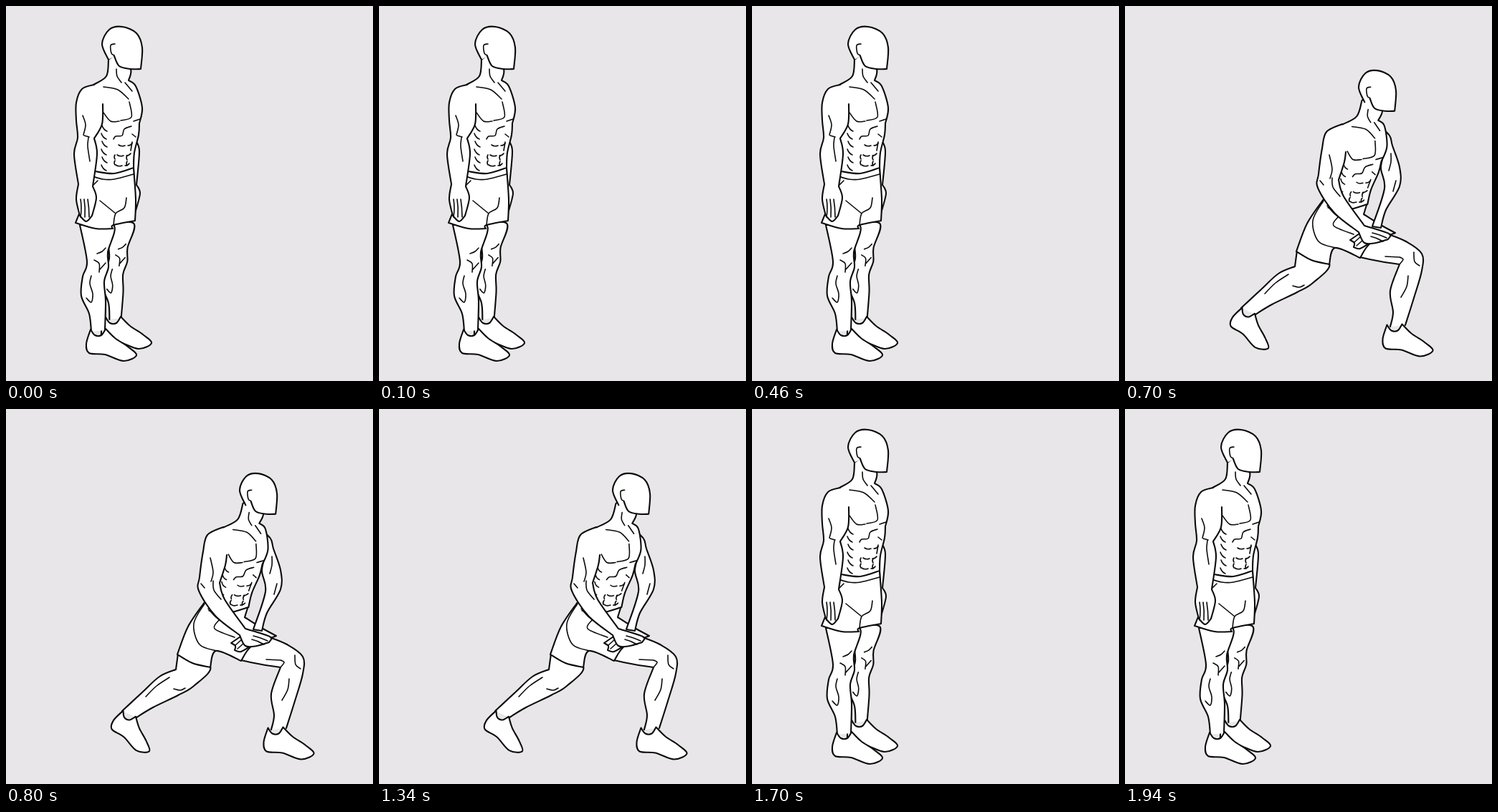
An HTML page that plays this animation: 512x524 px, repeating every 2100 ms.

```html
<!DOCTYPE html>
<html lang="en">
<head>
<meta charset="utf-8">
<title>Lunge exercise</title>
<style>
  html, body { margin: 0; width: 100%; height: 100%; overflow: hidden; background: #e8e6e9; }
  svg { display: block; width: 100%; height: 100%; }
  path { stroke: #0b0b0b; stroke-linecap: round; stroke-linejoin: round; vector-effect: non-scaling-stroke; }
  .shape { fill: #fff; stroke-width: 2.1; }
  .line { fill: none; stroke-width: 1.6; }
</style>
</head>
<body>
<svg viewBox="0 0 512 524">
  <g id="stand"></g>
  <g id="lunge"></g>
</svg>
<script>
// Catmull-Rom curve through the points, as Bezier segments
function smoothRun(points) {
  return points.slice(1).map((b, i) => {
    const a = points[i], before = points[i - 1] || a, after = points[i + 2] || b;
    const c1 = a.map((v, k) => v + (b[k] - before[k]) / 6);
    const c2 = b.map((v, k) => v - (after[k] - a[k]) / 6);
    return `C${c1} ${c2} ${b}`;
  }).join('');
}

// Key points are joined smoothly; "/" makes a corner, ";" lifts the pen.
function curve(text) {
  return text.split(';').map(stroke => {
    const runs = stroke.split('/').map(run =>
      run.trim().split(/\s+/).map(p => p.split(',').map(Number)));
    return 'M' + runs[0][0] + runs.map((run, i) =>
      smoothRun(i ? [runs[i - 1].at(-1), ...run] : run)).join('');
  }).join('');
}

const path = (kind, d) => `<path class="${kind}" d="${d}"/>`;
const shape = points => path('shape', curve(points));
const lines = points => path('line', curve(points));
const repeat = (count, stroke) =>
  path('line', Array.from({ length: count }, (_, i) => stroke(i)).join(''));
const place = (transform, ...parts) => `<g transform="${transform}">${parts.join('')}</g>`;

// Body parts shared by both poses
const head =
  shape('143,75 134,53 144,33 162,29 182,38 190,58 188,88 / 174,88 158,84 151,70') +
  lines('152,53 146,55 147,66 151,69');

const torso =
  shape('122,110 140,98 143,75 / 160,60 / 174,88 171,104 / 181,112 190,142 186,164 / 185,180 179,205 178,226 / 151,234 124,231') +
  lines('154,88 155,98 161,107;166,107 176,119') +
  lines('136,113 156,117 171,130;172,134 175,155 160,160;136,149 146,161 158,161;178,161 187,158') +
  lines('150,186 153,182 162,181 165,172 175,168;176,179 181,183;176,190 174,202') +
  repeat(3, i => `M${157 - 2 * i},${194 + 14 * i}q4 3 9 1m4 0q4 0 6 -3`) +
  repeat(2, i => `M152,${208 + 8 * i}q-2 3 0 6m17 -5q-2 3 0 6`) +
  repeat(6, i => `M${134 - i % 2},${167 + 11 * i}q2 6 7 8`);

const leg =
  shape('119,455 116,430 105,405 107,378 113,357 103,306 / 150,306 142,344 143,365 137,385 139,412 138,453') +
  lines('139,338 134,343 127,346;123,355 130,360 130,372;139,359 131,368') +
  lines('119,377 117,388 121,402 119,414 112,408');

const shoe = shape('118,452 / 112,472 116,485 138,487 164,496 182,488 170,476 152,464 139,451 / 133,460 124,460 118,452');

const standing = [
  shape('181,188 186,203 182,250 / 187,262 180,289 / 178,225'),
  place('matrix(.85 0 -.05 .9 66 28.4)', leg),
  place('translate(21 -17)', shoe),
  leg,
  shoe,
  shape('121,231 / 113,262 97,303 / 125,311 149,311 / 150,306 180,300 / 181,270 178,227'),
  lines('121,238 135,242 151,242 178,235;131,272 153,290;168,268 165,282 153,290 150,306;122,250 128,244'),
  torso,
  shape('123,110 106,116 98,135 98,160 100,184 95,207 101,249 / 98,270 103,293 / 112,301 120,293 / 126,268 121,252 / 127,207 123,185 / 134,165 135,137'),
  lines('107,153 111,166 108,180;115,184 114,196 117,217;109,181 116,183'),
  repeat(3, i => `M${104 + 5 * i},270q2 12 ${i} 25`),
  head
];

const lunging = [
  shape('162,422 190,396 214,374 237,364 / 240,342 / 285,360 262,387 240,400 205,417 182,431'),
  lines('250,390 243,393 234,391;228,375 210,387 195,402'),
  place('translate(172 426) rotate(28) scale(.92) translate(-128.5 -452)', shoe),
  shape('370,448 374,428 370,398 383,361 / 357,357 328,351 / 322,330 365,318 / 392,329 414,346 414,370 403,408 391,446'),
  lines('403,344 404,357 411,363;383,361 388,354 383,351;363,350 384,351;395,377 393,392 385,407'),
  place('translate(247.5 -6.5)', shoe),
  shape('277,270 254,304 239,343 / 260,355 285,361 / 293,338 328,352 / 343,331 377,317 / 355,305 333,291 / 338,275'),
  lines('277,272 262,300 270,329 294,338;282,279 293,291 304,299;298,294 291,307 319,319'),
  shape('353,166 369,181 373,195 383,225 383,252 364,285 357,310 / 345,308 / 362,255 357,225 365,195'),
  lines('371,206 371,218 368,230;378,244 374,259'),
  place('matrix(1 0 -.18 .96 201 60)', torso),
  shape('330,316 314,327 / 320,331 319,337 / 328,339 345,329'),
  repeat(2, i => `M${329 + 3 * i},${322 + 5 * i}l-9 8`),
  shape('303,165 281,176 275,199 270,235 269,254 292,289 326,316 / 334,331 350,331 367,326 / 368,318 334,307 / 305,266 298,243 / 306,218 308,204'),
  lines('285,208 289,228 286,241;289,240 290,253 300,266;272,244 277,250'),
  repeat(2, i => `M${345 - 2 * i},${317 + 5 * i}q9 2 ${20 - 3 * i} 7`),
  place('translate(352 118) scale(.93 .96) translate(-162 -58)', head)
];

function draw(id, parts) {
  const group = document.getElementById(id);
  group.innerHTML = parts.join('');
  return group;
}

const stand = draw('stand', standing);
const lunge = draw('lunge', lunging);
const LOOP = 2100, DOWN = 700, UP = 1700;
const start = performance.now();

function update() {
  const t = (performance.now() - start) % LOOP;
  const low = t >= DOWN && t < UP;
  stand.style.display = low ? 'none' : '';
  lunge.style.display = low ? '' : 'none';
  requestAnimationFrame(update);
}
update();
</script>
</body>
</html>
```
